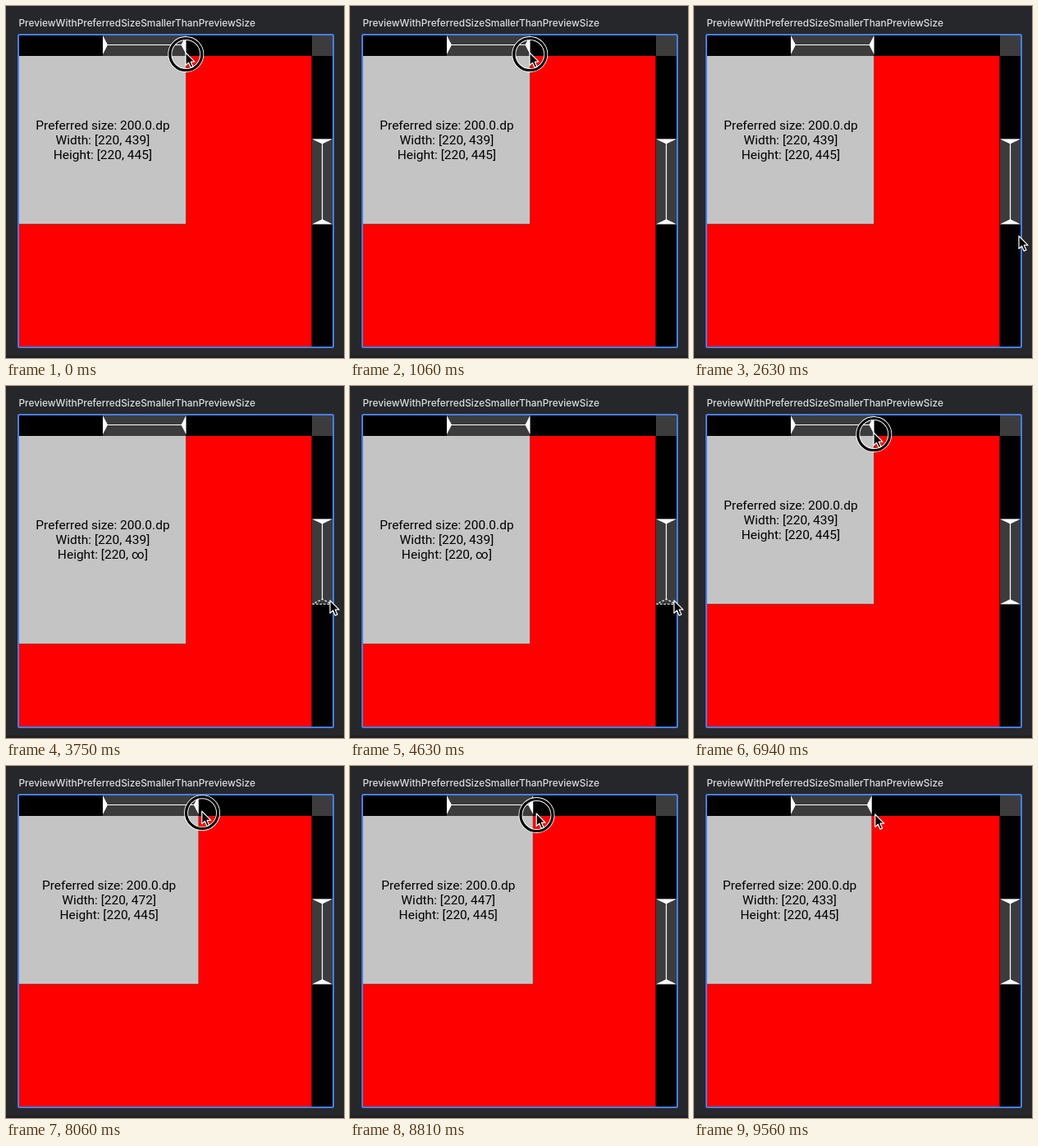
These frames come from a looping animation (412 px wide and 430 px high, 9620 ms). An HTML page:

```html
<!DOCTYPE html>
<html lang="en">
<head>
<meta charset="utf-8">
<title>Preview size limits</title>
<style>
  html, body { margin: 0; width: 100%; height: 100%; overflow: hidden; background: #26272b; }
  svg { display: block; }
  .title { font: 500 11.87px Inter, sans-serif; fill: #dcddde; }
  .info { font: 15.5px Roboto, sans-serif; fill: #000; text-anchor: middle; }
  .range { fill: #3c3c3c; }
  .line { stroke: #fff; stroke-width: 1.2; }
  .dashed { fill: none; stroke: #fff; stroke-width: 1.2; stroke-dasharray: 2.5 2; }
</style>
</head>
<body>
<svg width="412" height="430" viewBox="0 0 412 430">
  <rect y="427" width="412" height="3" fill="#1f2023"/>
  <text class="title" x="15.5" y="25">PreviewWithPreferredSizeSmallerThanPreviewSize</text>
  <rect x="15" y="35" width="384" height="382"/>
  <rect x="16" y="61" width="356.5" height="356" fill="#f00"/>
  <rect class="range" x="373" y="36" width="25" height="25"/>

  <rect id="box" x="16" y="61" fill="#c4c4c4"/>
  <path id="edge" fill="none" stroke="#500" stroke-opacity=".4"/>
  <g class="info">
    <text id="pref">Preferred size: 200.0.dp</text>
    <text id="wide"></text>
    <text id="high"></text>
  </g>

  <rect id="hRange" class="range" x="118" y="36" height="25"/>
  <path d="M118 36V59L124 47.5Z" fill="#fff"/>
  <line id="hLine" class="line" x1="123" y1="47.5" y2="47.5"/>
  <path id="hEnd" d="M0 36V59L-6 47.5Z" fill="#fff"/>

  <rect class="range" x="373" y="162.5" width="25" height="104"/>
  <path d="M373 162.5H398L385.5 168.5Z" fill="#fff"/>
  <line class="line" x1="385.5" y1="168" x2="385.5" y2="261"/>
  <path id="vEnd" d="M373 266.5H398L385.5 260.5Z" fill="#fff"/>
  <path id="vOpen" class="dashed" d="M373.5 266.5H397.5L385.5 260.5Z"/>

  <rect x="15" y="35" width="384" height="382" rx="1.5" fill="none" stroke="#467fea" stroke-width="2"/>

  <g id="pointer">
    <g id="press" fill="none" transform="translate(.3 2)">
      <circle r="19.5" stroke="#fff" stroke-width="5"/>
      <circle r="19.5" stroke="#000" stroke-width="3.2"/>
    </g>
    <path d="M0 0V15.5L3.6 12.2L6.2 18.3L8.9 17.1L6.3 11.2H11Z" fill="#000" stroke="#fff" stroke-width="1.2" stroke-linejoin="round"/>
  </g>
</svg>
<script>
const LOOP = 9620, STEP = 62.5;
const LEFT = 16, TOP = 61, SCALE = 0.4635;
const HOME = [219, 57];
const CLICK = 190;                        // how long a click is held
const clicks = [3690, 4060, 4500, 5060];  // releases; each one toggles the height limit

const $ = id => document.getElementById(id);
const set = (id, attrs) => {
  for (const name in attrs) $(id).setAttribute(name, attrs[name]);
};
const show = (id, on) => { $(id).style.display = on ? "" : "none"; };

const progress = (t, from, to) => Math.min(1, Math.max(0, (t - from) / (to - from)));
const easeOut = p => 1 - (1 - p) ** 3;
const smooth = p => p * p * (3 - 2 * p);
const mix = (a, b, p) => a.map((v, i) => v + (b[i] - v) * p);

function pointerAt(t, drag, edge) {
  if (drag > 0) {
    const lag = 4 * Math.min(1, drag * 6);
    return [edge + lag, HOME[1] + 2 * drag - 4 * Math.sin(Math.PI * drag)];
  }
  let p = mix(HOME, [396, 281], smooth(progress(t, 1690, 2600)));
  p = mix(p, [395, 262], smooth(progress(t, 3130, 3400)));
  return mix(p, HOME, easeOut(progress(t, 5750, 6600)));
}

function draw(time) {
  const t = Math.floor((time % LOOP + 5) / STEP) * STEP % LOOP;
  const drag = progress(t, 7880, 8880);
  const max = Math.round(439 - 6 * drag + 63 * Math.sin(Math.PI * drag));
  const open = clicks.filter(c => c <= t).length % 2 === 1;
  const down = t < 1690 || (t >= 6500 && t < 9060) || clicks.some(c => t < c && t >= c - CLICK);

  const right = LEFT + max * SCALE;
  const bottom = open ? 315 : 266.5;
  const cx = (LEFT + right) / 2, cy = (TOP + bottom) / 2;

  set("box", { width: right - LEFT, height: bottom - TOP });
  set("edge", { d: `M${right} ${TOP}V${bottom}H${LEFT}` });
  ["pref", "wide", "high"].forEach((id, i) => set(id, { x: cx + 0.2, y: cy - 12.7 + i * 18 }));
  $("wide").textContent = `Width: [220, ${max}]`;
  $("high").textContent = `Height: [220, ${open ? "∞" : 445}]`;

  set("hRange", { width: right - 118 });
  set("hLine", { x2: right - 5 });
  set("hEnd", { transform: `translate(${right})` });
  show("vEnd", !open);
  show("vOpen", open);

  set("pointer", { transform: `translate(${pointerAt(t, drag, right)})` });
  show("press", down);
}

const start = performance.now();
function tick() {
  draw(performance.now() - start);
  requestAnimationFrame(tick);
}
tick();
</script>
</body>
</html>
```
